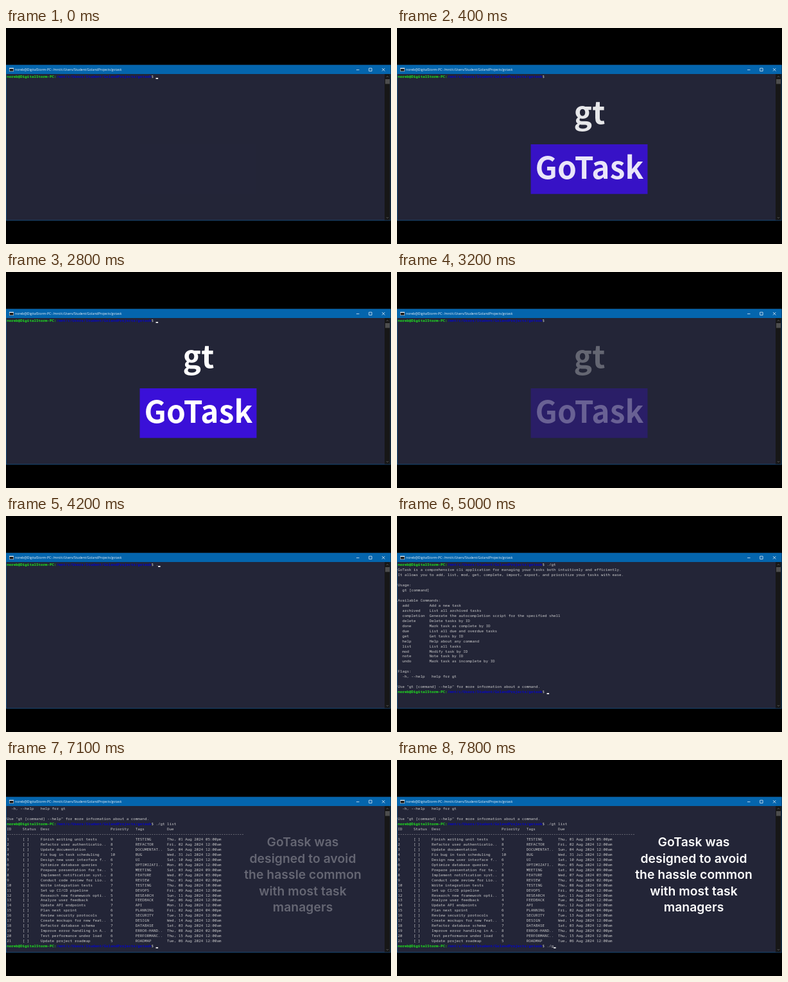
These frames come from a looping animation (600 px wide and 338 px high, 8 s). An HTML page with a canvas:

```html
<!DOCTYPE html>
<html lang="en">
<head>
<meta charset="utf-8">
<title>GoTask</title>
<style>
  html, body { margin: 0; width: 100%; height: 100%; overflow: hidden; background: #000; }
  canvas { display: block; }
</style>
</head>
<body>
<canvas id="stage" width="600" height="338"></canvas>
<script>
const ctx = document.getElementById("stage").getContext("2d");
const LOOP = 8000, COL = 3.52, ROW = 7.96, LEFT = 1.2, BASE = 78.2, VISIBLE_ROWS = 28;
const MONO = '"Noto Sans Mono", monospace';
const USER = "noreb@DigitalStorm-PC:", PATH = "/mnt/c/Users/Student/GolandProjects/gotask";

const help = `GoTask is a comprehensive cli application for managing your tasks both intuitively and efficiently.
It allows you to add, list, mod, get, complete, import, export, and prioritize your tasks with ease.

Usage:
  gt [command]

Available Commands:
  add         Add a new task
  archived    List all archived tasks
  completion  Generate the autocompletion script for the specified shell
  delete      Delete tasks by ID
  done        Mark task as complete by ID
  due         List all due and overdue tasks
  get         Get tasks by ID
  help        Help about any command
  list        List all tasks
  mod         Modify task by ID
  note        Note task by ID
  undo        Mark task as incomplete by ID

Flags:
  -h, --help   help for gt

Use "gt [command] --help" for more information about a command.`.split("\n");

const tasks = `Finish writing unit tests|9|TESTING|Thu, 01 Aug|05:00pm
Refactor user authenticatio..|8|REFACTOR|Fri, 02 Aug
Update documentation|7|DOCUMENTAT..|Sun, 04 Aug
Fix bug in task scheduling|10|BUG|Wed, 31 Jul
Design new user interface f..|6|UI|Sat, 10 Aug
Optimize database queries|7|OPTIMIZATI..|Mon, 05 Aug
Prepare presentation for te..|5|MEETING|Sat, 03 Aug|09:00am
Implement notification syst..|8|FEATURE|Wed, 07 Aug|03:00pm
Conduct code review for Lio..|6|REVIEW|Thu, 01 Aug|02:00pm
Write integration tests|7|TESTING|Thu, 08 Aug|10:00am
Set up CI/CD pipeline|9|DEVOPS|Fri, 09 Aug
Research new framework opti..|5|RESEARCH|Sun, 11 Aug
Analyze user feedback|4|FEEDBACK|Tue, 06 Aug
Update API endpoints|7|API|Mon, 12 Aug
Plan next sprint|6|PLANNING|Fri, 02 Aug|04:00pm
Review security protocols|9|SECURITY|Tue, 13 Aug
Create mockups for new feat..|5|DESIGN|Wed, 14 Aug
Refactor database schema|7|DATABASE|Sat, 03 Aug
Improve error handling in A..|8|ERROR-HAND..|Thu, 08 Aug|02:00pm
Test performance under load|6|PERFORMANC..|Thu, 15 Aug
Update project roadmap|5|ROADMAP|Tue, 06 Aug`.split("\n");

const tableRow = (id, status, desc, priority, tags, due) =>
  id.padEnd(7) + status.padEnd(8) + desc.padEnd(31) + priority.padEnd(11) + tags.padEnd(14) + due;

const list = [
  tableRow("ID", "Status", "Desc", "Priority", "Tags", "Due"),
  "-".repeat(105),
  ...tasks.map((line, i) => {
    const [desc, priority, tags, day, hour = "12:00am"] = line.split("|");
    return tableRow(String(i + 1), "[ ]", desc, priority, tags, `${day} 2024 ${hour}`);
  })
];

// keys: time at which each character is typed; run: time of Enter
const commands = [
  { text: "./gt", keys: [4100, 4400, 4500, 4600], run: 4800, output: help },
  { text: "./gt list", keys: [5800, 5900, 6000, 6500, 6600, 6650, 6700, 6800, 6850], run: 7000, output: list },
  { text: "./g", keys: [7700, 7750, 7800], run: Infinity, output: [] }
];

const clamp = v => Math.max(0, Math.min(1, v));

function rect(x, y, w, h, color) {
  ctx.fillStyle = color;
  ctx.fillRect(x, y, w, h);
}

function path(d, color, width = 0.7) {
  ctx.strokeStyle = color;
  ctx.lineWidth = width;
  ctx.stroke(new Path2D(d));
}

// Set at ten times the size and scaled down, so small glyphs keep exact advances
function text(str, x, y, size, family, color, weight = 400, align = "left") {
  ctx.save();
  ctx.translate(x, y);
  ctx.scale(0.1, 0.1);
  ctx.font = `${weight} ${size * 10}px ${family}`;
  ctx.textAlign = align;
  ctx.fillStyle = color;
  ctx.fillText(str, 0, 0);
  ctx.restore();
}

function termText(str, col, row, color, weight) {
  text(str, LEFT + col * COL, BASE + row * ROW, COL / 0.6, MONO, color, weight);
}

function drawWindow() {
  rect(0, 0, 600, 338, "#000");
  rect(0, 57.5, 599.5, 244, "#174a78");
  rect(1, 72, 597.5, 228.5, "#232537");
  rect(0, 58, 599.5, 14, "#0465ad");
  rect(5, 62.5, 7, 5.5, "#d8dde2");
  rect(5.6, 64, 5.8, 3.4, "#111");
  text(`${USER} ${PATH}`, 14, 67.2, 5.1, '"Open Sans", sans-serif', "#eef4fa");
  path("M546 65.5h4.5M565.7 63h4.4v4.4h-4.4zM586 63l4.4 4.4M590.4 63l-4.4 4.4", "#fff");
  rect(590, 72, 8.5, 228.5, "#171717");
  rect(591, 80, 7, 7.5, "#4d4d4d");
  path("M592.8 77l1.6-1.6 1.6 1.6M592.8 296l1.6 1.6 1.6-1.6", "#777");
}

function drawTerminal(t) {
  const lines = [];
  let typed = "", lastKey = -LOOP;
  for (const { text, keys, run, output } of commands) {
    const count = keys.filter(k => k <= t).length;
    typed = text.slice(0, count);
    if (count) lastKey = keys[count - 1];
    lines.push({ typed });
    if (t < run) break;
    lines.push(...output);
  }
  const top = Math.max(0, lines.length - VISIBLE_ROWS);
  lines.slice(top).forEach((line, row) => {
    if (typeof line === "string") return termText(line, 0, row, "#cccccc");
    termText(USER, 0, row, "#1fe51f", 700);
    termText(PATH, USER.length, row, "#0606c4", 700);
    termText("$ " + line.typed, USER.length + PATH.length, row, "#cccccc");
  });
  const blinkOn = (t - 535 + LOOP * 1.06) % 1060 < 530;
  if (blinkOn || t - lastKey < 400) {
    const col = USER.length + PATH.length + 2 + typed.length;
    rect(LEFT + col * COL, 78 + (lines.length - 1 - top) * ROW, COL, 1.8, "#f2f2f2");
  }
}

function drawTitle(t) {
  const font = '"Noto Sans CJK JP", "Noto Sans CJK SC", sans-serif';
  ctx.globalAlpha = Math.min(clamp(t / 450), clamp((3350 - t) / 500));
  rect(208.5, 182, 182, 77.7, "#3a10d8");
  text("gt", 300, 149.5, 48, font, "#fff", 700, "center");
  text("GoTask", 300, 235.5, 48, font, "#fff", 700, "center");
  ctx.globalAlpha = 1;
}

function drawCaption(t) {
  ctx.globalAlpha = clamp((t - 6950) / 500);
  ["GoTask was", "designed to avoid", "the hassle common", "with most task", "managers"].forEach((line, i) =>
    text(line, 462.5, 135 + i * 25.5, 19.4, "Inter, sans-serif", "#fff", 600, "center"));
  ctx.globalAlpha = 1;
}

function frame() {
  const t = performance.now() % LOOP;
  drawWindow();
  drawTerminal(t);
  drawTitle(t);
  drawCaption(t);
  requestAnimationFrame(frame);
}
frame();
</script>
</body>
</html>
```
